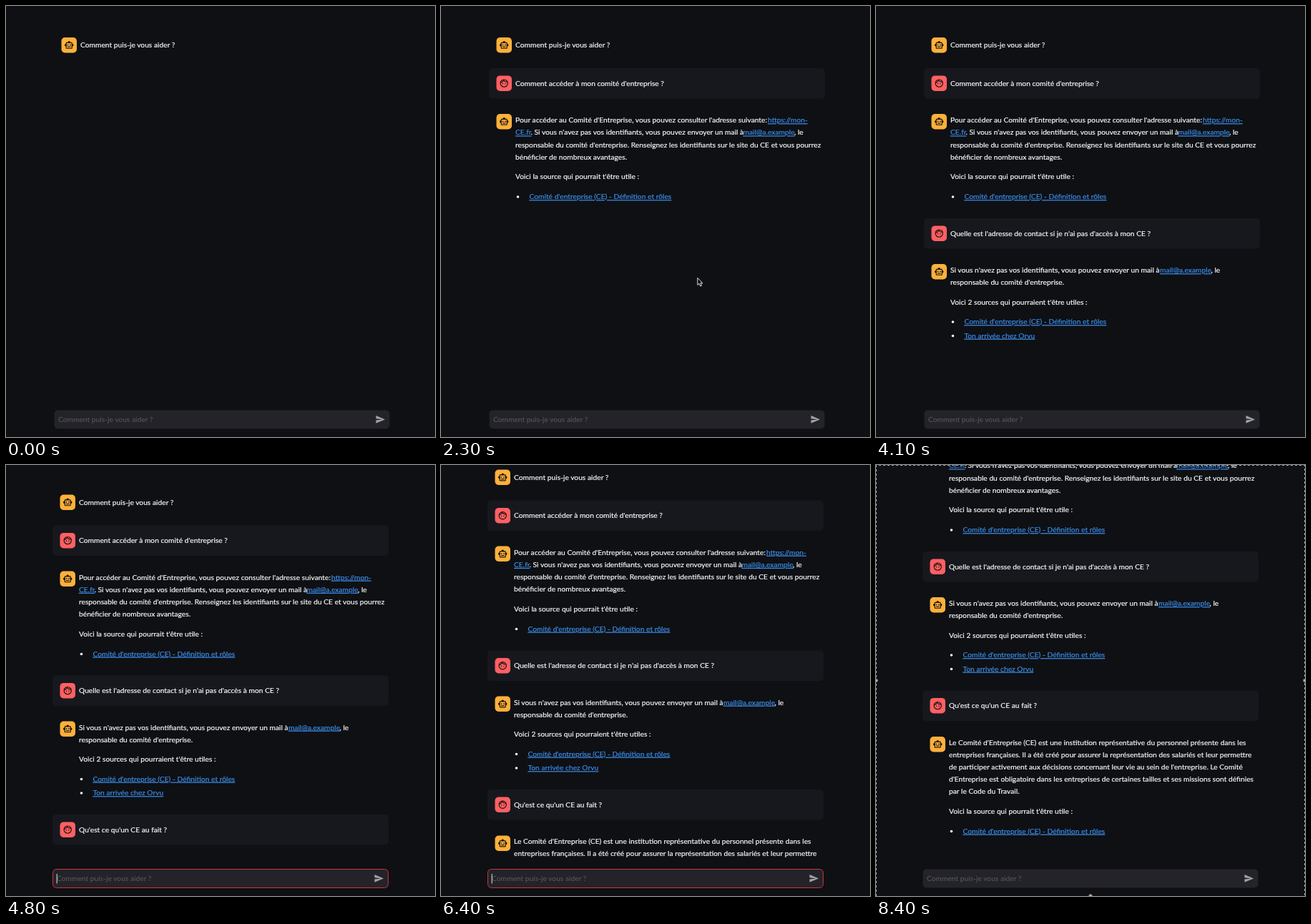
An HTML page that plays this animation: 600x603 px, repeating every 8500 ms.

```html
<!DOCTYPE html>
<html lang="fr">
<head>
<meta charset="utf-8">
<style>
  html, body { margin: 0; width: 100%; height: 100%; overflow: hidden; background: #0e1014; }
  svg { display: block; width: 600px; height: 603px; }
  text { font: 10.25px Lato, sans-serif; fill: #fafafa; stroke: #fafafa; stroke-width: .2px; white-space: pre; }
  .link { fill: #3d8ee8; stroke: #3d8ee8; text-decoration: underline; }
  #placeholder { fill: #5b5c63; stroke: none; }
</style>
</head>
<body>
<svg viewBox="0 0 600 603">
  <defs>
    <g id="bot">
      <rect width="21.5" height="21.5" rx="5" fill="#ffb03b"/>
      <g transform="translate(3.9 3.9) scale(.57)" fill="#15130f">
        <path fill-rule="evenodd" d="M20 9V7c0-1.1-.9-2-2-2h-3a3 3 0 0 0-6 0H6c-1.1 0-2 .9-2 2v2a3 3 0 0 0 0 6v4c0 1.1.9 2 2 2h12c1.1 0 2-.9 2-2v-4a3 3 0 0 0 0-6zM18 19H6V7h12z"/>
        <circle cx="9" cy="11.5" r="1.5"/><circle cx="15" cy="11.5" r="1.5"/>
        <path d="M8 15h8v2H8z"/>
      </g>
    </g>
    <g id="user">
      <rect width="21.5" height="21.5" rx="5" fill="#ff6062"/>
      <g transform="translate(3.9 3.9) scale(.57)" fill="none" stroke="#1a1013" stroke-width="2">
        <circle cx="12" cy="12" r="9"/>
        <path d="M3.5 11Q9 9.5 10.5 4.5Q14 9.5 20.5 9"/>
        <g fill="#1a1013" stroke="none"><circle cx="9" cy="13.2" r="1.3"/><circle cx="15" cy="13.2" r="1.3"/></g>
      </g>
    </g>
  </defs>
  <g id="page">
    <g id="chat"></g>
    <rect x="60" y="553" width="490" height="50" fill="#0e1014"/>
    <rect id="field" x="67.5" y="565.5" width="469" height="26" rx="5" fill="#232329"/>
    <text id="placeholder" x="73" y="582.3">Comment puis-je vous aider ?</text>
    <text id="typed" x="73" y="582.3"></text>
    <path id="caret" d="M73.2 572v13.5" stroke="#e4e4e8"/>
    <path d="M2 21 23 12 2 3v7l15 2-15 2z" transform="translate(516.3 571.2) scale(.6)" fill="#a2a3a9"/>
  </g>
  <path id="mouse" d="M0 0v10l2.3-2 1.6 3.6 1.7-.7-1.6-3.5h3z" fill="#000" stroke="#fff" stroke-width=".9"/>
  <g id="selection">
    <path d="M.5 603V.5H599.5V603" fill="none" stroke="#a9a9ab" stroke-dasharray="3 3"/>
    <g fill="#b9b9bb" stroke="#555"><circle cx="0" cy="301.5" r="2.5"/><circle cx="600" cy="301.5" r="2.5"/><circle cx="300" cy="603" r="2.5"/></g>
  </g>
</svg>
<script>
const $ = id => document.getElementById(id);
const LOOP = 8500;
const questions = [
  "Comment accéder à mon comité d'entreprise ?",
  "Quelle est l'adresse de contact si je n'ai pas d'accès à mon CE ?",
  "Qu'est ce qu'un CE au fait ?"
];
const mail = "mail@a.example";
const definition = "Comité d'entreprise (CE) - Définition et rôles";

// y is the vertical centre of the capitals
const text = (x, y, content, link) =>
  `<text x="${x}" y="${y + 3.7}"${link ? ' class="link"' : ""}>${content}</text>`;
const lines = (y, step, ...rows) => rows.map((row, i) => text(104, y + i * step, row)).join("");
const bullet = (y, content) =>
  `<circle cx="107.5" cy="${y + .5}" r="1.8" fill="#fafafa"/>` + text(123.5, y, content, true);
const avatar = (kind, y) => `<use href="#${kind}" x="77.5" y="${y}"/>`;
const question = (y, content) =>
  `<rect x="67" y="${y - 21}" width="470" height="42.5" rx="5" fill="#17181e"/>` +
  avatar("user", y - 10.6) + text(104, y, content);

const messages = [
  [0, avatar("bot", 44) + text(104, 54.7, "Comment puis-je vous aider ?")],
  [1200, question(108, questions[0])],
  [1450, avatar("bot", 151) +
    text(104, 159.5, "Pour accéder au Comité d'Entreprise, vous pouvez consulter l'adresse suivante:") +
    text(457, 159.5, "https://mon-", true) +
    text(104, 176.7, "CE.fr", true) +
    text(125.5, 176.7, ". Si vous n'avez pas vos identifiants, vous pouvez envoyer un mail à") +
    text(422.5, 176.7, mail, true) + text(494, 176.7, ", le") +
    lines(194, 17, "responsable du comité d'entreprise. Renseignez les identifiants sur le site du CE et vous pourrez",
      "bénéficier de nombreux avantages.") +
    text(104, 238.5, "Voici la source qui pourrait t'être utile :") + bullet(266.5, definition)],
  [3600, question(318, questions[1])],
  [3900, avatar("bot", 361) +
    text(104, 369.5, "Si vous n'avez pas vos identifiants, vous pouvez envoyer un mail à") +
    text(397, 369.5, mail, true) + text(468.5, 369.5, ", le") +
    text(104, 386.5, "responsable du comité d'entreprise.") +
    text(104, 414, "Voici 2 sources qui pourraient t'être utiles :") +
    bullet(441.5, definition) + bullet(461, "Ton arrivée chez Orvu")],
  [4700, question(512.5, questions[2])],
  [5000, avatar("bot", 556) +
    lines(564, 17, "Le Comité d'Entreprise (CE) est une institution représentative du personnel présente dans les",
      "entreprises françaises. Il a été créé pour assurer la représentation des salariés et leur permettre",
      "de participer activement aux décisions concernant leur vie au sein de l'entreprise. Le Comité",
      "d'Entreprise est obligatoire dans les entreprises de certaines tailles et ses missions sont définies",
      "par le Code du Travail.") +
    text(104, 660, "Voici la source qui pourrait t'être utile :") + bullet(688, definition)]
];
$("chat").innerHTML = messages.map(([, body]) => `<g>${body}</g>`).join("");

const typing = [[1000, 1200], [3300, 3600], [4400, 4700]];
const focused = [[1000, 1700], [2700, 4000], [4300, 7100]];
const caretOff = [[1200, 1700], [3600, 4000], [5400, 5600], [5900, 6100]];
const pointer = [[700, 1000], [2200, 3300]];

const within = (t, spans) => spans.some(([from, to]) => t >= from && t < to);
const progress = (t, from, to) => Math.min(1, Math.max(0, (t - from) / (to - from)));
const easeOut = p => 1 - (1 - p) ** 2;
const show = (element, visible) => element.style.display = visible ? "" : "none";

function draw(t) {
  messages.forEach(([start], i) => show($("chat").children[i], t >= start));

  const overflowing = t >= 4700;
  const scroll = overflowing ? 2.5 + 173.5 * easeOut(progress(t, 6300, 7250)) : 0;
  $("page").setAttribute("transform", `translate(${overflowing ? -2 : 0} 0)`);
  $("chat").setAttribute("transform", `translate(0 ${-scroll})`);

  const active = typing.findIndex(span => within(t, [span]));
  const entry = active < 0 ? "" : questions[active].slice(0,
    Math.ceil(questions[active].length * progress(t, typing[active][0], typing[active][1] - 80)));
  $("typed").textContent = entry;
  show($("placeholder"), !entry);

  const hasFocus = within(t, focused);
  $("field").setAttribute("stroke", hasFocus ? "#c5373c" : "none");
  show($("caret"), hasFocus && !within(t, caretOff));
  const caretX = entry ? $("typed").getComputedTextLength() : 0;
  $("caret").setAttribute("transform", `translate(${caretX} 0)`);

  const move = easeOut(progress(t, 2200, 2500));
  const [x, y] = t < 2000 ? [264.5, 572.5] : [514 - 277 * move, 118 + 468.5 * move];
  show($("mouse"), within(t, pointer));
  $("mouse").setAttribute("transform", `translate(${x} ${y})`);

  show($("selection"), t >= 7800);
}

function frame() {
  draw(performance.now() % LOOP);
  requestAnimationFrame(frame);
}
frame();
</script>
</body>
</html>
```
